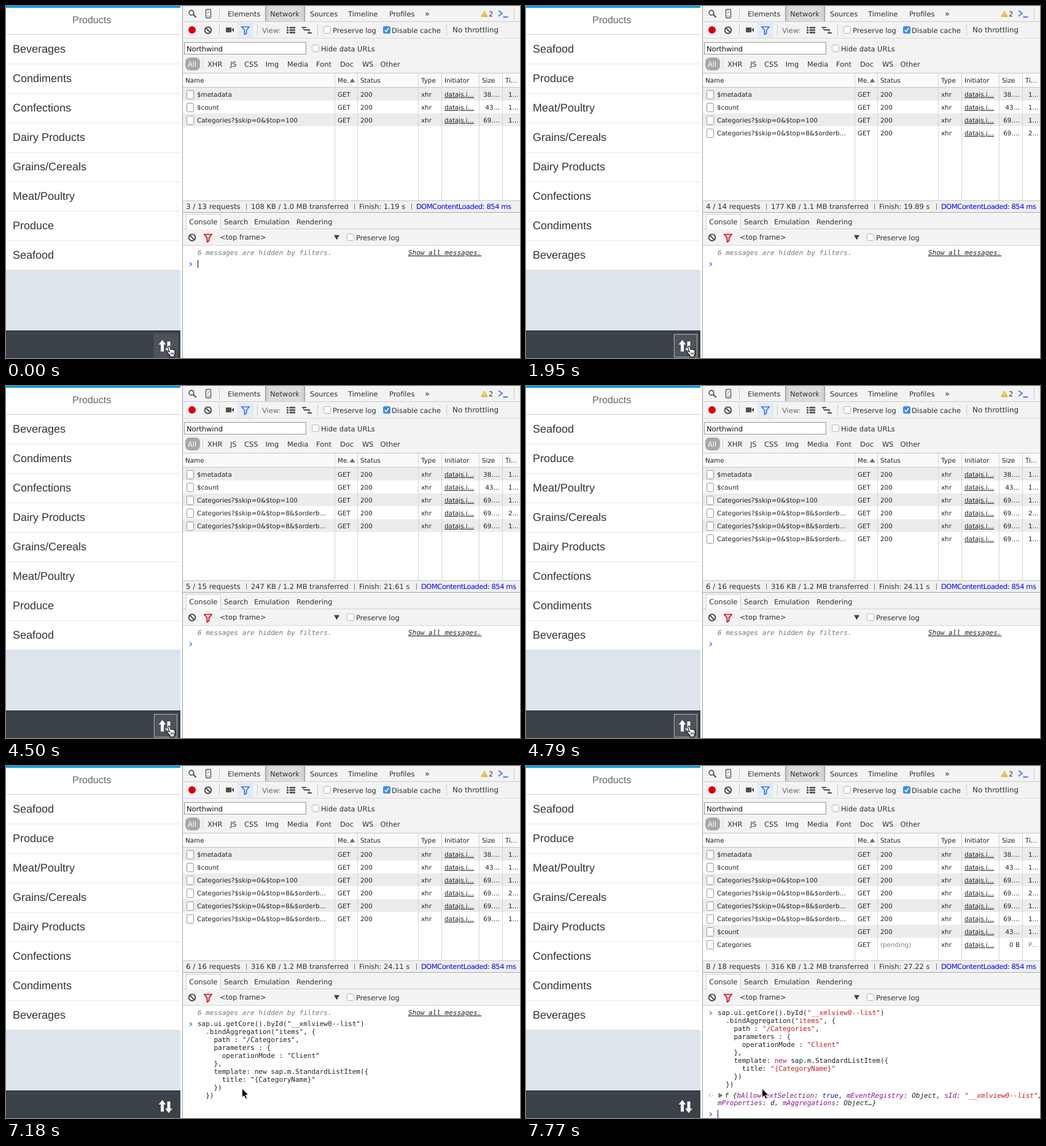
An HTML page that plays this animation: 837x574 px, repeating every 8000 ms.

```html
<!DOCTYPE html>
<html lang="en">
<head>
<meta charset="utf-8">
<title>Products</title>
<style>
html, body { margin: 0; width: 100%; height: 100%; overflow: hidden; background: #fff; }
svg { display: block; width: 837px; height: 574px; }
text { white-space: pre; text-rendering: geometricPrecision; }
.ui { font: 11.45px "DejaVu Sans", sans-serif; fill: #303030; }
.cell { font: 10.35px "DejaVu Sans", sans-serif; fill: #222; }
.mono { font: 11px "DejaVu Sans Mono", monospace; fill: #222; }
.app { font: 18px "Liberation Sans", Arial, sans-serif; fill: #333; }
.it { font-style: italic; }
.link { text-decoration: underline; }
</style>
</head>
<body>
<svg id="stage" viewBox="0 0 837 574" xmlns="http://www.w3.org/2000/svg"></svg>
<script>
const LOOP = 8000;
const stage = document.getElementById('stage');
const RED = '#c41a16', PURPLE = '#881391', KEYWORD = '#aa0d91';

const esc = s => s.replace(/&/g, '&amp;').replace(/</g, '&lt;').replace(/>/g, '&gt;');
const text = (x, y, s, cls = 'ui', more = '') =>
  `<text x="${x}" y="${y}" class="${cls}" ${more}>${esc(s)}</text>`;
const rect = (x, y, w, h, fill, more = '') =>
  `<rect x="${x}" y="${y}" width="${w}" height="${h}" fill="${fill}" ${more}/>`;
const path = (d, fill = 'none', more = '') => `<path d="${d}" fill="${fill}" ${more}/>`;
const hline = (x, y, w, c) => rect(x, y, w, 1, c);
const vline = (x, y, h, c) => rect(x, y, 1, h, c);
const group = (id, body, more = '') => `<g id="${id}" ${more}>${body}</g>`;
const at = (x, y, body) => `<g transform="translate(${x} ${y})">${body}</g>`;

// One line of code made of [string, colour] pieces
const colored = (x, y, parts, cls = 'mono') =>
  `<text x="${x}" y="${y}" class="${cls}">` +
  parts.map(([s, c]) => `<tspan style="fill:${c || '#222'}">${esc(s)}</tspan>`).join('') + '</text>';

const checkbox = (x, y) => rect(x + .5, y + .5, 11, 11, '#fff', 'rx="2" stroke="#b4b4b4"');
const clearIcon = (x, y) =>
  `<circle cx="${x}" cy="${y}" r="5.3" fill="none" stroke="#505050" stroke-width="2"/>` +
  path(`M${x - 3.7} ${y - 3.7}l7.4 7.4`, 'none', 'stroke="#505050" stroke-width="2"');
const funnel = (x, y, c) =>
  path(`M${x} ${y}h12l-4.4 5.5v5l-3.2 1.8v-6.8z`, 'none', `stroke="${c}" stroke-width="1.7"`);
const chevron = (y, c) =>
  path(`M299 ${y - 3}l3.4 3l-3.4 3`, 'none', `stroke="${c}" stroke-width="1.6"`);

function appShell() {
  return rect(0, 0, 284, 574, '#fff') + rect(0, 0, 284, 3, '#009de0') +
    text(108, 28, 'Products', 'app', 'style="font-size:16px;fill:#666"') +
    hline(0, 46, 284, '#d0d0d0') +
    [1, 2, 3, 4, 5, 6, 7].map(i => hline(0, 46 + 48 * i, 284, '#e5e5e5')).join('') +
    rect(0, 430, 284, 100, '#dde4eb') + rect(0, 529, 284, 45, '#3b4148') +
    hline(0, 529, 284, '#30363c');
}

function topBars() {
  const sep = (x, y) => vline(x, y, 18, '#c8c8c8');
  let s = rect(288, 0, 549, 110, '#f3f3f3') + vline(287, 0, 574, '#a3a3a3');
  s += hline(288, 25, 549, '#cdcdcd') + hline(288, 52, 549, '#dadada');
  // Panel tabs
  s += `<circle cx="302" cy="11" r="3.8" fill="none" stroke="#505050" stroke-width="1.7"/>` +
    path('M305 14l4.5 4.5', 'none', 'stroke="#505050" stroke-width="2.2"') +
    rect(325.5, 5.5, 8, 14, '#fff', 'rx="1.5" stroke="#555" stroke-width="1.4"') +
    path('M327 16.5h5M331 8l-3 5', 'none', 'stroke="#777"') + sep(347, 4);
  s += rect(422, 0, 65, 25, 'url(#tab)') + vline(422, 1, 24, '#8f8f8f') + vline(486, 1, 24, '#8f8f8f');
  for (const [x, n] of [[361, 'Elements'], [430, 'Network'], [495, 'Sources'], [557, 'Timeline'], [624, 'Profiles']])
    s += text(x, 17, n);
  s += text(682, 17, '»', 'ui', 'style="font-size:13px"') +
    path('M779 8.3l5 9h-10z', '#f2b632', 'stroke="#e0a010" stroke-width=".8" stroke-linejoin="round"') +
    path('M779 11v3.3M779 15.2v1.2', 'none', 'stroke="#fff" stroke-width="1.2"') + text(786, 17, '2') +
    path('M802 7.5l6 4.5l-6 4.5M809.5 18h8', 'none', 'stroke="#4a7df0" stroke-width="1.8"') + sep(827, 4);
  // Recording tools
  s += `<circle cx="303" cy="39" r="6" fill="#d8000c"/>` + clearIcon(329, 39.5) + sep(347, 30) +
    rect(358, 35, 9, 8, '#505050') + path('M367 39l4-3.5v7z', '#505050') +
    rect(377, 27, 26, 25, '#e4ebf7') + funnel(384, 34, '#3879d9') + sep(409, 30) +
    text(417, 44, 'View:', 'ui', 'style="fill:#6a6a6a"');
  for (const y of [34, 38, 42]) s += rect(457, y, 3, 2.6, '#505050') + rect(461.5, y, 9.5, 2.6, '#505050');
  s += rect(482, 34, 7, 2, '#505050') + rect(485, 38, 10, 2, '#505050') + rect(491, 43, 7, 2, '#505050') +
    path('M484.5 36v3M493.5 40v4', 'none', 'stroke="#505050"') + sep(507, 30) +
    checkbox(517, 33) + text(532, 44, 'Preserve log') +
    rect(614, 33, 12, 12, '#3b8cf0', 'rx="2.5"') +
    path('M616.8 39.2l2.4 2.7l4-6', 'none', 'stroke="#fff" stroke-width="1.7"') +
    text(628, 44, 'Disable cache') + sep(717, 30) +
    text(727, 43, 'No throttling', 'ui', 'style="font-size:11.9px"');
  // Filter
  s += rect(290.5, 59.5, 198, 19, '#fff', 'stroke="#999"') +
    text(294, 73.5, 'Northwind', 'ui', 'style="fill:#111"') +
    checkbox(498, 63) + text(513, 74, 'Hide data URLs') +
    rect(292, 84, 24, 21, '#a8a8a8', 'rx="7.5"') + text(296, 99, 'All', 'ui', 'style="fill:#fff"') +
    vline(320, 86, 17, '#d0d0d0');
  for (const [x, n] of [[328, 'XHR'], [365, 'JS'], [388, 'CSS'], [422.5, 'Img'], [458, 'Media'],
    [505, 'Font'], [544, 'Doc'], [580, 'WS'], [609.5, 'Other']]) s += text(x, 99, n);
  return s;
}

function row(i, [name, size, time, status = '200']) {
  const y = 133 + 21 * i, b = y + 15, gray = status === '200' ? '' : 'style="fill:#808080"';
  return rect(288, y, 549, 21, i % 2 ? '#fff' : '#ececec') +
    rect(294.5, y + 4.5, 11, 14, '#fff', 'rx="1" stroke="#989898"') +
    text(311, b, name, 'cell') + text(540, b, 'GET', 'cell') + text(577, b, status, 'cell', gray) +
    text(676, b, 'xhr', 'cell') + text(714, b, 'datajs.j…', 'cell link') +
    text(804, b, size, 'cell', 'text-anchor="end"') + text(818, b, time, 'cell', gray);
}

const paged = 'Categories?$skip=0&$top=8&$orderb…';
const requests = [
  ['$metadata', '38.…', '1…'], ['$count', '43…', '1…'], ['Categories?$skip=0&$top=100', '69.…', '1…'],
  [paged, '69.…', '2…'], [paged, '69.…', '1…'], [paged, '69.…', '1…'],
  ['$count', '43…', '1…'], ['Categories', '0 B', 'P…', '(pending)']
];

function tableHead() {
  let s = rect(288, 110, 549, 23, '#fafafa') + hline(288, 109, 549, '#c4c4c4') + hline(288, 132, 549, '#c4c4c4');
  for (const [x, n] of [[292, 'Name'], [540, 'Me.'], [577, 'Status'], [676, 'Type'],
    [714, 'Initiator'], [775, 'Size'], [813, 'Ti…']]) s += text(x, 125, n, 'cell');
  return s + path('M559.5 124.5h9l-4.5-6.5z', '#6a6a6a');
}

const columns = () => [535, 572, 671, 709, 770, 808].map(x => vline(x, 110, 207, '#d2d2d2')).join('');

function statusBar([count, sent, finish]) {
  const end = finish.length > 6 ? 676 : 668;
  const bar = x => vline(x, 322, 10, '#777');
  return rect(288, 317, 549, 20, '#f0f0f0') + hline(288, 317, 549, '#c4c4c4') + hline(288, 336, 549, '#a8a8a8') +
    text(293, 331, count + ' requests', 'ui', 'style="font-size:11.8px"') + bar(391) +
    text(399, 331, sent + ' MB transferred', 'ui') + bar(567) +
    text(575, 331, 'Finish: ' + finish, 'ui') + bar(end - 8) +
    text(end, 331, 'DOMContentLoaded: 854 ms', 'ui', 'style="fill:#00f;letter-spacing:-.44px"');
}

function consoleBars() {
  return rect(288, 337, 549, 54, '#f3f3f3') + hline(288, 363, 549, '#cdcdcd') + hline(288, 390, 549, '#d4d4d4') +
    rect(293.5, 339.5, 56, 25, '#fff', 'stroke="#cdcdcd"') + rect(294, 363, 55, 2, '#f6f6f6') +
    text(298, 356, 'Console', 'ui', 'style="font-size:11.7px"') + text(355, 356, 'Search') +
    text(404, 356, 'Emulation') + text(473, 356, 'Rendering') +
    clearIcon(303, 377.5) + funnel(323, 372.5, '#d8000c') + text(348, 381, '<top frame>') +
    path('M534 373.5h9l-4.5 8z', '#444') + checkbox(555, 371) + text(570, 382, 'Preserve log');
}

const code = [
  ['sap.ui.getCore().byId("__xmlview0--list")'],
  ['  .bindAggregation("items", {'],
  ['    path : "/Categories",'],
  ['    parameters : {'],
  ['      operationMode : "Client"'],
  ['    },'],
  ['    template: new sap.m.StandardListItem({'],
  ['      title: "{CategoryName}"'],
  ['    })'],
  ['  })']
].flat();

const codeBlock = (y, tint) => code.map((line, i) => colored(312, y + 13 * i,
  line.split(/("[^"]*"|\bnew\b)/).map(p =>
    [p, tint && (p[0] === '"' ? RED : p === 'new' ? KEYWORD : '')]))).join('');

function result() {
  return path('M301 534.5l-3 2.5l3 2.5', 'none', 'stroke="#bbb" stroke-width="1.2"') + rect(303, 536.3, 1.5, 1.5, '#bbb') +
    path('M313.5 533l7 4.2l-7 4.2z', '#6e6e6e') +
    colored(323.5, 541, [['f {'], ['bAllowTextSelection', PURPLE], [': '], ['true', '#0d22aa'], [', '],
      ['mEventRegistry', PURPLE], [': Object, '], ['sId', PURPLE], [': '], ['"__xmlview0--list"', RED], [',']], 'mono it') +
    colored(312, 553, [['mProperties', PURPLE], [': d, '], ['mAggregations', PURPLE], [': Object…}']], 'mono it');
}

const hand = path('M5 11L3 4Q2.5 2 4 1.5Q5.5 1.2 6 3L7.3 7Q8.5 5.8 9.8 7Q11 6 12 7.5Q13.5 7 14 9L14.2 13' +
  'Q14 15 13 16.5V19H6.5L6 17Q3.5 15 2 12Q.5 10.5 1 9.7Q2.2 9 5 11Z', '#fff', 'stroke="#000" stroke-width="1.1"') +
  path('M7.8 12v3.5M9.8 12v3.5M11.8 12v3.5', 'none', 'stroke="#000" stroke-width=".8"');
const arrow = path('M0 0V14.5L3.3 11.4L5.6 16.8L8 15.8L5.7 10.5H10.3Z', '#000', 'stroke="#fff" stroke-width=".8"');

const foods = ['Beverages', 'Condiments', 'Confections', 'Dairy Products', 'Grains/Cereals',
  'Meat/Poultry', 'Produce', 'Seafood'];

stage.innerHTML =
  '<defs><linearGradient id="tab"><stop stop-color="#c4c4c4"/><stop offset=".12" stop-color="#dcdcdc"/>' +
  '<stop offset=".88" stop-color="#dcdcdc"/><stop offset="1" stop-color="#c4c4c4"/></linearGradient></defs>' +
  rect(0, 0, 837, 574, '#fff') + appShell() + group('list', '') +
  group('hover', rect(240, 534, 40, 40, '#4c535a')) +
  group('focus', rect(241.5, 535.5, 37, 37, 'none', 'stroke="#fff" stroke-dasharray="1 1"')) +
  path('M254.5 544.5l5.8 7.5h-3.3v11.5h-5v-11.5h-3.3zM265 566l-5.8-7.5h3.4v-11.5h4.8v11.5h3.4z', '#fff') +
  topBars() + tableHead() + group('rows', '') + columns() + group('status', '') + consoleBars() +
  group('idle', text(312, 406, '6 messages are hidden by filters.', 'mono it', 'style="fill:#777"') +
    text(655, 406, 'Show all messages.', 'mono it link') + chevron(421, '#3f83ee')) +
  group('typed', codeBlock(424, false)) +
  group('done', chevron(403, '#8a8a8a') + codeBlock(406, true) + result() + chevron(568, '#3f83ee')) +
  group('caret', rect(0, 0, 1, 13, '#111')) +
  group('hand', at(261, 553, hand)) + group('arrow', arrow);

const el = id => document.getElementById(id);
const show = (id, on) => el(id).setAttribute('visibility', on ? 'visible' : 'hidden');
const move = (id, x, y) => el(id).setAttribute('transform', `translate(${x} ${y})`);
const cache = {};
function fill(id, key, make) {
  if (cache[id] === key) return;
  cache[id] = key;
  el(id).innerHTML = make();
}
// Last entry whose start time has passed
const pick = (t, steps) => steps.filter(s => s[0] <= t).pop();

const network = [
  [0, 3, '3 / 13', '108 KB / 1.0', '1.19 s'],
  [450, 4, '4 / 14', '131 KB / 1.1', '19.88 s'],
  [750, 4, '4 / 14', '177 KB / 1.1', '19.89 s'],
  [2250, 5, '5 / 15', '247 KB / 1.2', '21.61 s'],
  [4790, 6, '6 / 16', '316 KB / 1.2', '24.11 s'],
  [7770, 8, '8 / 18', '316 KB / 1.2', '27.22 s']
];
const carets = [[0, 312, 414], [150], [5690, 312, 414], [6290], [6740, 584, 414], [7180], [7630, 312, 561]];

function draw(t) {
  const reversed = (t >= 450 && t < 2250) || t >= 4640;
  fill('list', reversed, () => (reversed ? [...foods].reverse() : foods)
    .map((n, i) => text(11, 76 + 48 * i, n, 'app')).join(''));

  const [start, count, ...totals] = pick(t, network);
  fill('rows', start, () => requests.slice(0, count).map((r, i) =>
    row(i, start === 450 && i === 3 ? [r[0], '23.…', r[2]] : r)).join(''));
  fill('status', start, () => statusBar(totals));

  const onButton = t < 5390;
  show('hover', onButton);
  show('hand', onButton);
  show('focus', t >= 300 && t < 5690);
  show('arrow', !onButton);
  if (t < 5540) move('arrow', 357, 532); else move('arrow', 384.5, 526);

  show('idle', t < 7630);
  show('typed', t >= 6740 && t < 7630);
  show('done', t >= 7630);
  const [, x, y] = pick(t, carets);
  show('caret', x !== undefined);
  if (x !== undefined) move('caret', x, y);
}

function tick() {
  draw(performance.now() % LOOP);
  requestAnimationFrame(tick);
}
tick();
</script>
</body>
</html>
```
